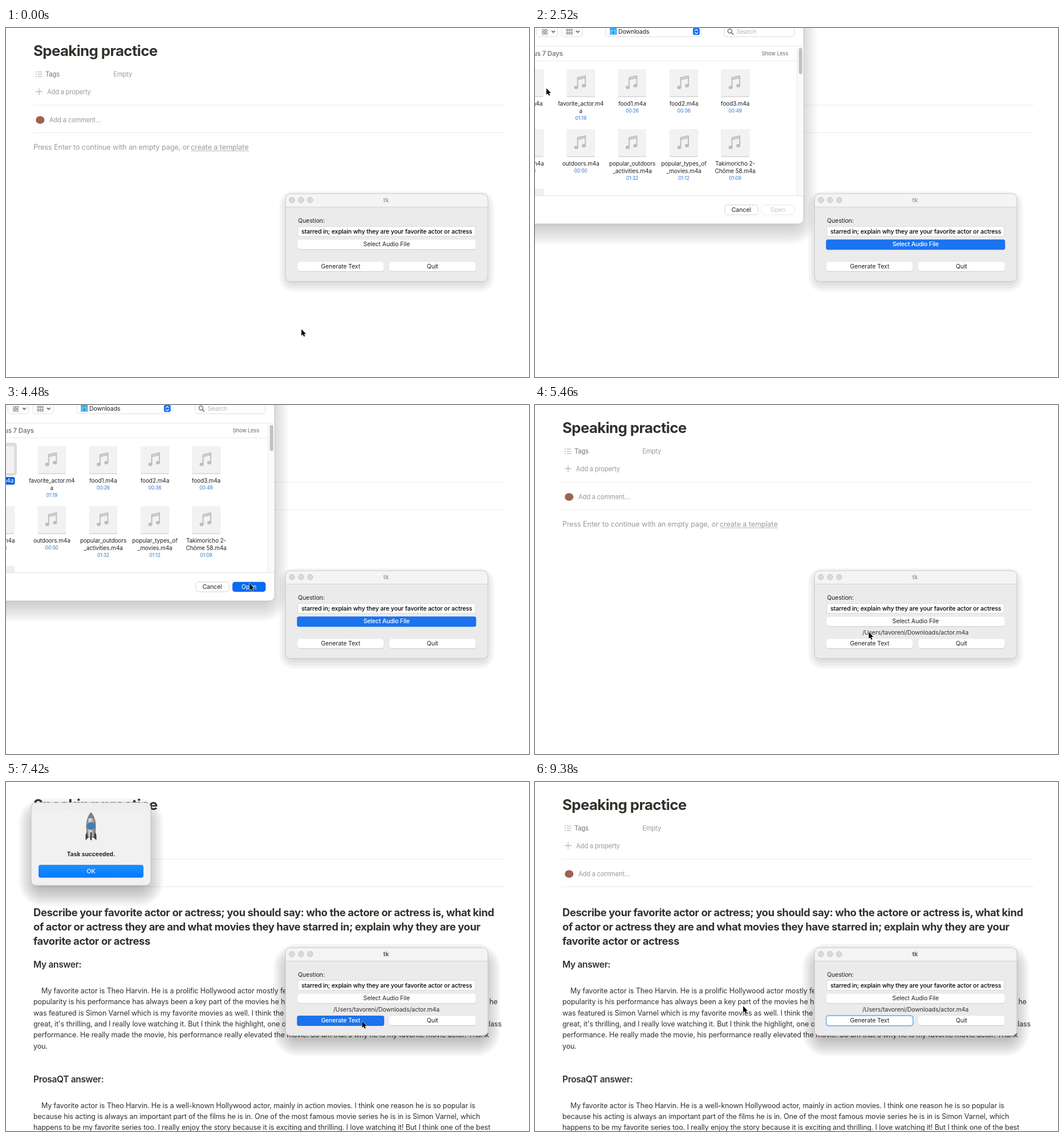
Animation of 917 by 611 pixels, one loop 9520 ms. Source, as an HTML page:

```html
<!DOCTYPE html>
<html lang="en">
<head>
<meta charset="utf-8">
<title>Speaking practice</title>
<style>
html, body { margin: 0; width: 100%; height: 100%; overflow: hidden; background: #fff; }
svg { display: block; width: 917px; height: 611px; font-family: Inter, Roboto, sans-serif; }
</style>
</head>
<body>
<svg id="stage" viewBox="0 0 917 611" xmlns="http://www.w3.org/2000/svg"></svg>
<script>
const LOOP = 9520, STEP = 70;
const INK = '#33312c', BLUE = '#1b73ee';

const text = (x, y, s, size, o = {}) =>
  `<text x="${x}" y="${y}" font-size="${size}" fill="${o.fill || '#222'}" font-weight="${o.weight || 400}"` +
  ` letter-spacing="${o.ls ?? -0.13}" text-anchor="${o.anchor || 'start'}">${s}</text>`;
const mid = (x, y, s, size, o = {}) => text(x, y, s, size, { ...o, anchor: 'middle' });
const rect = (x, y, w, h, r, fill, extra = '') =>
  `<rect x="${x}" y="${y}" width="${w}" height="${h}" rx="${r}" fill="${fill}" ${extra}/>`;
const path = (d, color, width = 1) =>
  `<path d="${d}" fill="none" stroke="${color}" stroke-width="${width}" stroke-linecap="round" stroke-linejoin="round"/>`;
const group = (id, body) => `<g id="${id}">${body}</g>`;

// Banded drop shadow: translucent boxes, each inset a little more than the last
function shadow(x, y, w, h, side, top, bottom, step, alpha) {
  let out = '';
  for (let d = 0; d < bottom; d += step) {
    out += rect(x - side + d, y - top + d, w + 2 * (side - d), h + top + bottom - 2 * d,
      Math.max(9, side * 1.7 + 6 - d), '#000', `fill-opacity="${alpha}"`);
  }
  return out;
}

function page() {
  const gray = { fill: '#9b9a97', ls: -0.2 };
  const line = y => rect(47, y, 828, 1, 0, '#ececeb');
  let list = '';
  for (const y of [77, 81, 85]) list += rect(52, y - .7, 1.6, 1.4, .5, '#a5a4a1') + rect(55.5, y - .5, 8, 1, 0, '#a5a4a1');
  return text(48, 48.5, 'Speaking practice', 25.8, { fill: INK, weight: 700, ls: -0.6 }) +
    list + text(69, 85, 'Tags', 11.2, { fill: '#73726e', ls: -0.1 }) +
    text(188.5, 85, 'Empty', 11.2, gray) +
    path('M52.5 111.5H63.5M58 106V117', '#a5a4a1') +
    text(72, 115.5, 'Add a property', 11.2, gray) + line(134.5) +
    '<ellipse cx="59.8" cy="161" rx="7.6" ry="6.8" fill="#a0614f"/>' +
    text(76, 165, 'Add a comment…', 11.2, gray) + line(182.8);
}

function placeholder() {
  const gray = { fill: '#9b9a97', ls: -0.11 };
  return text(48, 213, 'Press Enter to continue with an empty page, or', 12.6, gray) +
    text(324, 213, 'create a template', 12.6, gray) + rect(324.5, 214.6, 101.5, .9, 0, '#a9a8a5');
}

const heading = () => [
  'Describe your favorite actor or actress; you should say: who the actore or actress is, what kind',
  'of actor or actress they are and what movies they have starred in; explain why they are your',
  'favorite actor or actress'
].map((s, i) => text(48, 234.5 + i * 25, s, 18.4, { fill: INK, weight: 700, ls: -0.4 })).join('');

function answer(y, title, lines) {
  const o = { fill: INK, ls: -0.11 };
  return text(48, y, title, 15.5, { fill: INK, weight: 600, ls: -0.33 }) +
    lines.map((s, i) => text(i ? 48 : 62, y + 45 + i * 19.35, s, 12.5, o)).join('');
}

const firstAnswer = () => answer(325, 'My answer:', [
  'My favorite actor is Theo Harvin. He is a prolific Hollywood actor mostly featured',
  'popularity is his performance has always been a key part of the movies he has',
  'was featured is Simon Varnel which is my favorite movies as well. I think the story',
  'great, it\'s thrilling, and I really love watching it. But I think the highlight, one of',
  'performance. He really made the movie, his performance really elevated the movie. So um that\'s why he is my favorite movie actor. Thank',
  'you.'
]) + text(862, 389.4, 'he', 12.5, { fill: INK, anchor: 'end' }) +
  text(869, 428, 'class', 12.5, { fill: INK, anchor: 'end' });

const secondAnswer = () => answer(525.5, 'ProsaQT answer:', [
  'My favorite actor is Theo Harvin. He is a well-known Hollywood actor, mainly in action movies. I think one reason he is so popular is',
  'because his acting is always an important part of the films he is in. One of the most famous movie series he is in is Simon Varnel, which',
  'happens to be my favorite series too. I really enjoy the story because it is exciting and thrilling. I love watching it! But I think one of the best'
]);

function button(x, y, w, label, id) {
  const cx = x + w / 2, base = y + 11.4;
  return rect(x, y + .6, w, 17, 4.5, '#c9c9c9') + rect(x, y, w, 16.6, 4.5, '#fff') +
    mid(cx, base, label, 10.6) +
    (id ? group(id, rect(x - .8, y - .5, w + 1.6, 18, 3.5, BLUE) +
      mid(cx, base, label, 10.6, { fill: '#fff', weight: 500, ls: -0.2 })) : '');
}

function tkWindow() {
  const [x, y, w, h] = [490, 290, 355, 154];
  const lights = (colors, stroke) => colors.map((c, i) =>
    `<circle cx="${501.3 + i * 16}" cy="301.3" r="4.7" fill="${c}" stroke="${stroke || c}" stroke-width=".8"/>`).join('');
  const bar = fill => `<path d="M490 313.5V299a9 9 0 0 1 9-9H836a9 9 0 0 1 9 9V313.5Z" fill="${fill}"/>`;
  const title = fill => mid(666.5, 304.8, 'tk', 10.6, { fill, weight: 700 });
  return group('wideShadow', shadow(x, y, w, h, 21, 7, 36, 4, .034)) +
    group('thinShadow', shadow(x, y, w, h, 10.5, 4, 17, 5, .04)) +
    rect(x, y, w, h, 9, '#ebebeb') +
    group('activeBar', bar('#fff') + lights(['#f45f57', '#f5bd30', '#2bc640']) + title('#444')) +
    group('idleBar', bar('#f4f4f4') + lights(['#dadada', '#dadada', '#dadada'], '#b9b9b9')) +
    group('paleTitle', title('#a6a6a6')) + group('darkTitle', title('#5c5c5c')) +
    rect(x, 313, w, .9, 0, '#d2d2d2') +
    rect(x, y, w, h, 9, 'none', 'stroke="#bcbcbc" stroke-width=".8"') +
    text(512, 341.2, 'Question:', 10.6) +
    rect(512, 347.5, 310.5, 17, 0, '#fff', 'stroke="#d6d6d6" stroke-width=".8"') +
    text(518, 359.7, 'starred in; explain why they are your favorite actor or actress', 10.6, { fill: '#000', weight: 500 }) +
    button(511, 370.7, 312.5, 'Select Audio File', 'selectOn') +
    group('filePath', mid(667, 401.6, '/Users/tavoreni/Downloads/actor.m4a', 10.6, { fill: '#333' })) +
    button(511, 409.4, 151.3, 'Generate Text', 'generateOn') +
    group('focusRing', rect(510.5, 409, 152.3, 17.8, 4.5, 'none', 'stroke="#85b8f5" stroke-width="2"')) +
    button(672, 409.4, 151.5, 'Quit');
}

function audioFile(cx, y, lines, time) {
  const note = path(`M${cx - 5.5} ${y + 31.5}V${y + 15}L${cx + 8} ${y + 12}V${y + 28.5}M${cx - 5.5} ${y + 18}L${cx + 8} ${y + 15}`, '#bdbdbd', 1.9) +
    `<ellipse cx="${cx - 8}" cy="${y + 32}" rx="3.6" ry="2.9" fill="#bdbdbd"/>` +
    `<ellipse cx="${cx + 5.4}" cy="${y + 29}" rx="3.6" ry="2.9" fill="#bdbdbd"/>`;
  return rect(cx - 24.5, y, 49, 49, 1, '#d4d4d4') + rect(cx - 24.5, y, 49, 47.5, 1, '#f2f2f2') + note +
    lines.map((s, i) => mid(cx, y + 64 + i * 13, s, 10, { ls: -0.1 })).join('') +
    mid(cx, y + 63.3 + lines.length * 12.6, time, 8.3, { fill: '#2b74c9', ls: 0 });
}

function fileDialog() {
  const edge = 'stroke="#dadada" stroke-width=".9"';
  const box = (x, w) => rect(x, -8, w, 23.2, 4.5, '#fff', edge);
  const cols = [-10, 80.3, 170.5, 261, 351];
  const rows = [
    [['actor.m4a'], '01:14'], [['favorite_actor.m4', 'a'], '01:19'], [['food1.m4a'], '00:26'],
    [['food2.m4a'], '00:36'], [['food3.m4a'], '00:49'],
    [['music.m4a'], '00:58'], [['outdoors.m4a'], '00:50'], [['popular_outdoors', '_activities.m4a'], '01:32'],
    [['popular_types_of', '_movies.m4a'], '01:12'], [['Takimoricho 2-', 'Chōme 58.m4a'], '01:09']
  ];
  let icons = '';
  for (const y of [2.5, 7.5]) for (const x of [12.8, 17.8]) icons += rect(x, y, 3.6, 3.6, .7, 'none', 'stroke="#555" stroke-width=".9"');
  for (const y of [2, 7.5]) for (const x of [55, 59, 63]) icons += rect(x, y, 2.6, 2.6, .5, 'none', 'stroke="#555" stroke-width=".8"') + rect(x, y + 3.6, 2.6, .7, 0, '#777');
  icons += path('M29.6 5.2l2.6 2.6 2.6-2.6M72.2 5.2l2.6 2.6 2.6-2.6', '#444', 1.3);
  return shadow(-60, -60, 531, 403, 23, 7, 36, 4, .022) +
    rect(-60, -60, 531, 403, 9, '#fff', 'stroke="#b9b9b9" stroke-width=".8"') +
    box(3, 37) + box(47, 36) + box(124, 167) + box(331.5, 123) + icons +
    rect(131, 0, 12.5, 12, 1.6, '#3fa6e8') + rect(131, 3, 12.5, 9, 1.4, '#62bdf3') +
    path('M137.2 4.8v4.6M135.2 7.6l2 2 2-2', '#2484c4', 1.1) +
    text(146, 9.9, 'Downloads', 10.6, { ls: -0.15 }) +
    rect(276.8, 0, 12, 12.2, 3, BLUE) + path('M280.4 4.6l2.4-2.2 2.4 2.2M280.4 7.8l2.4 2.2 2.4-2.2', '#fff', 1.2) +
    '<circle cx="341.7" cy="5.3" r="3.6" fill="none" stroke="#555" stroke-width="1.2"/>' + path('M344.4 8l3 3.2', '#555', 1.3) +
    text(353.5, 10.2, 'Search', 10.6, { fill: '#b5b5b5' }) +
    rect(0, 31, 471, .8, 0, '#dedede') +
    rect(459.5, 31.5, 11, 261.5, 0, '#fafafa') + rect(459.2, 31.5, .8, 261.5, 0, '#e5e5e5') +
    rect(462.6, 35, 6, 45.5, 3, '#c1c1c1') +
    text(49, 49, 'Previous 7 Days', 11.4, { fill: '#7d7d7d', weight: 600, ls: -0.1, anchor: 'end' }) +
    text(444, 48.3, 'Show Less', 9.2, { fill: '#7d7d7d', weight: 500, ls: -0.1, anchor: 'end' }) +
    rect(0, 57, 459, .8, 0, '#e6e6e6') +
    group('pickedBack', rect(-40, 66, 59, 58, 5, '#dcdcdc')) +
    rows.map(([s, time], i) => audioFile(cols[i % 5], i < 5 ? 72 : 177, s, time)).join('') +
    rect(-34, 281.5, 49, 11.5, 0, '#efefef') +
    group('pickedLabel', rect(-40, 126, 55.5, 13.6, 3, '#0b62da') + mid(-10, 136, 'actor.m4a', 10, { fill: '#fff', ls: -0.1 })) +
    rect(0, 293, 471, .9, 0, '#dcdcdc') +
    rect(332.8, 309.8, 58.2, 17.2, 4.5, '#fff', 'stroke="#d0d0d0" stroke-width=".9"') + mid(361.5, 321.8, 'Cancel', 10.6) +
    rect(397, 309.8, 58.2, 17.2, 4.5, '#fff', 'stroke="#e6e6e6" stroke-width=".9"') + mid(426, 321.8, 'Open', 10.6, { fill: '#c4c4c4' }) +
    group('openOn', rect(397, 309.8, 58.2, 17.2, 4.5, '#086bf0') + mid(426, 321.8, 'Open', 10.6, { fill: '#fff' }));
}

function doneDialog() {
  return shadow(44, 36, 210, 145, 21, 7, 36, 4, .034) +
    rect(44, 36, 210, 145, 9, '#f1f1f1', 'stroke="#bababa" stroke-width=".8"') +
    '<path d="M45 53V46a9 9 0 0 1 9-9H244a9 9 0 0 1 9 9V52C215 47 190 55 150 51S80 50 45 53Z" fill="#eeeeee"/>' +
    '<path d="M143 84L139.5 93V102L144.5 97H153.5L158.5 102V93L155 84Z" fill="#3c3f42"/>' +
    '<path d="M149 53C143.6 60 141 68 141 77C141 85 142.4 91 144 97H154C155.6 91 157 85 157 77C157 68 154.4 60 149 53Z" fill="url(#metal)" stroke="#55585b" stroke-width=".7"/>' +
    '<path d="M149 53C146 56.5 144.4 60 143.2 63.5H154.8C153.6 60 152 56.5 149 53Z" fill="#7d8184"/>' +
    '<circle cx="149" cy="77" r="6.8" fill="#3f7fb5"/>' + rect(147.8, 88, 2.4, 14, 1, '#303335') +
    mid(149, 130, 'Task succeeded.', 10.3, { weight: 700, ls: -0.05, fill: '#2a2a2a' }) +
    rect(57, 145, 184, 22.5, 4, 'url(#glow)') +
    group('okPress', rect(57, 145, 184, 22.5, 4, '#0463d6')) +
    mid(149, 160, 'OK', 10.6, { fill: '#fff', weight: 500 });
}

const stage = document.getElementById('stage');
stage.innerHTML =
  `<defs><linearGradient id="metal"><stop stop-color="#777b7e"/><stop offset=".4" stop-color="#dfe1e2"/><stop offset="1" stop-color="#696d70"/></linearGradient>
  <linearGradient id="glow" x2="0" y2="1"><stop stop-color="#1f8fff"/><stop offset="1" stop-color="#0478fb"/></linearGradient></defs>` +
  rect(0, 0, 917, 611, 0, '#fff') + page() +
  group('hint', placeholder()) + group('topic', heading()) +
  group('mine', firstAnswer()) + group('theirs', secondAnswer()) +
  group('files', fileDialog()) + tkWindow() + group('done', doneDialog()) +
  group('pointer', '<path d="M0 0V11.4L2.6 9.1L4.3 13L6.2 12.2L4.5 8.4H8Z" fill="#000" stroke="#fff" stroke-width="1.1" stroke-linejoin="round" paint-order="stroke"/>');

const el = {};
stage.querySelectorAll('g[id]').forEach(g => el[g.id] = g);
const show = (id, on) => el[id].setAttribute('display', on ? 'inline' : 'none');

// Pointer moves: start, end, target x, target y
const START = [518, 527.3];
const MOVES = [
  [0, 560, 611.7, 370.3], [1610, 2380, 25, 106], [2450, 2590, 15, 105],
  [2660, 3010, 6, 98], [3710, 4410, 427, 312.5], [4760, 5740, 624.5, 418.8],
  [7910, 8750, 121, 162], [8890, 9380, 365, 392.3]
];
function pointerAt(t) {
  let [x, y] = START;
  for (const [a, b, tx, ty] of MOVES) {
    if (t <= a) break;
    const p = Math.min(1, (t - a) / (b - a)), e = p * p * (3 - 2 * p);
    x += (tx - x) * e;
    y += (ty - y) * e;
  }
  return [x, y];
}

function draw(time) {
  const t = Math.min(9380, Math.floor(time / STEP) * STEP);
  const during = (a, b = LOOP) => t >= a && t < b;
  const active = during(700, 1610) || during(5810, 7350);
  const late = during(7350);
  const picked = during(3080);
  show('hint', t < 6650);
  show('topic', during(6930));
  show('mine', during(7000));
  show('theirs', during(7070));
  show('files', during(1610, 4550));
  for (const id of ['pickedBack', 'pickedLabel', 'openOn']) show(id, picked);
  show('wideShadow', active || late);
  show('thinShadow', !active && !late);
  show('activeBar', active);
  show('idleBar', !active);
  show('paleTitle', !active && !late);
  show('darkTitle', late);
  show('selectOn', during(840, 4550));
  show('filePath', during(4550));
  show('generateOn', during(5880, 8890));
  show('focusRing', during(8890));
  show('done', during(7350, 8890));
  show('okPress', during(8820, 8890));
  el.done.setAttribute('opacity', Math.min(1, (t - 7280) / 140));
  el.pointer.setAttribute('transform', `translate(${pointerAt(t).map(v => v.toFixed(1))})`);
}

const begin = performance.now();
function tick() {
  draw((performance.now() - begin) % LOOP);
  requestAnimationFrame(tick);
}
tick();
</script>
</body>
</html>
```
